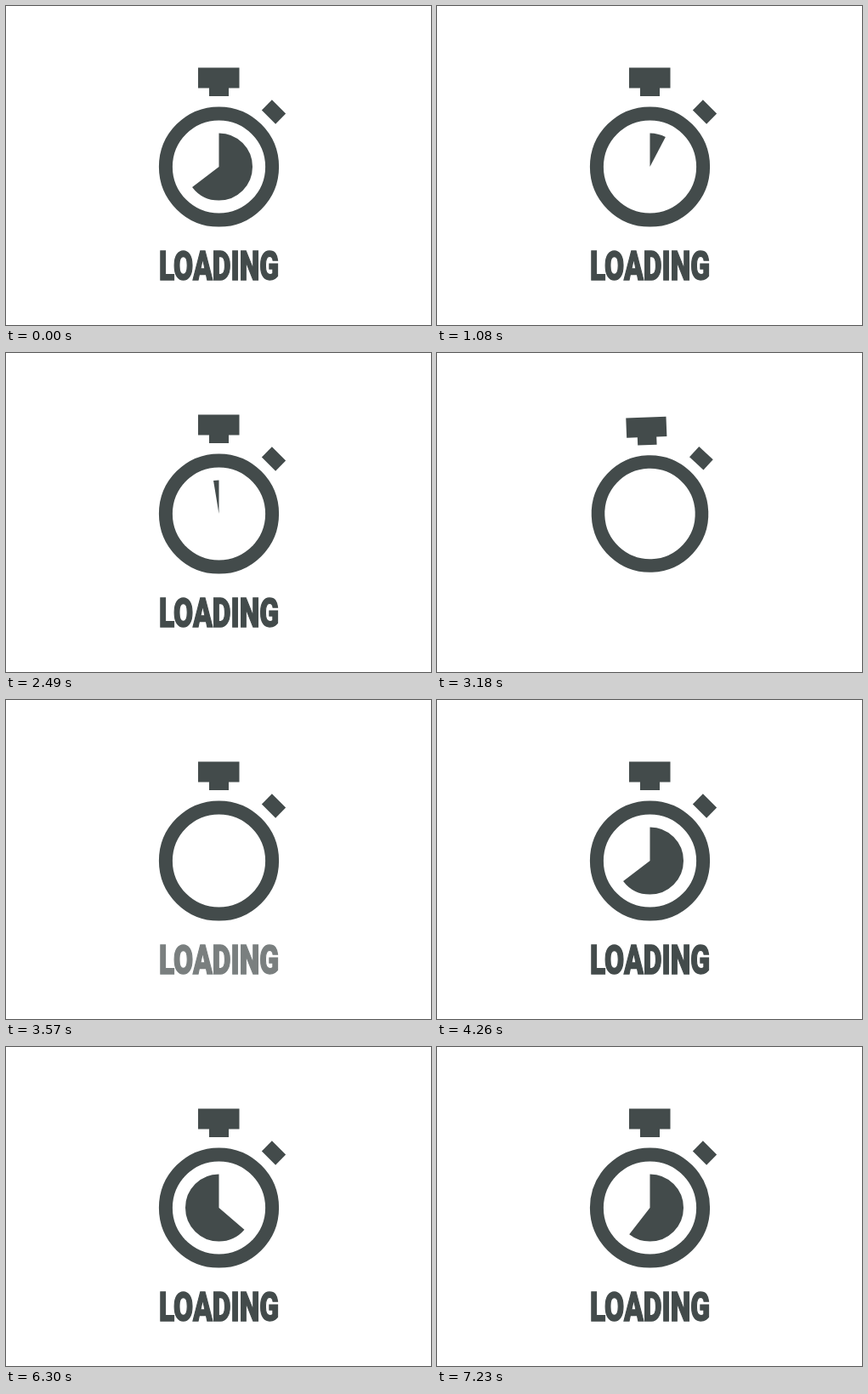
Write an HTML page that moves like this. It is 500 px wide and 375 px high and loops after 7260 ms.

```html
<!DOCTYPE html>
<html lang="en">
<head>
<meta charset="utf-8">
<title>Loading stopwatch</title>
<style>
  html, body { margin: 0; width: 100%; height: 100%; overflow: hidden; background: #fff; }
  svg { display: block; width: 500px; height: 375px; fill: #434b4b; }
  .line { fill: none; stroke: #434b4b; }
  text { font: 900 47.5px Roboto, "Liberation Sans", sans-serif; text-anchor: middle;
         stroke: #434b4b; stroke-width: 1.5px; }
</style>
</head>
<body>
<svg viewBox="0 0 500 375">
  <!-- the watch is drawn around its own centre -->
  <g id="watch">
    <circle class="line" r="62.6" stroke-width="16"/>
    <path d="M-24.5-116.5h48.5v24h-12.5v9.5h-23v-9.5h-13z"/>
    <rect x="-11.5" y="-8.5" width="23" height="17" transform="translate(64.5 -64.5) rotate(45)"/>
    <circle id="pie" class="line" r="19.75" stroke-width="39.5" pathLength="360" transform="rotate(-90)"/>
  </g>
  <g transform="translate(250.5 322.4) scale(.707 1)"><text id="label">LOADING</text></g>
</svg>
<script>
  const LOOP = 7260, STEP = 30, INTRO = 780, OUTRO = 6780, TURN = 1500, SPEED = 0.4878;
  const [watch, pie, label] = ["watch", "pie", "label"].map(id => document.getElementById(id));
  const clamp = (v, max = 1) => Math.min(max, Math.max(0, v));

  function drawPie(x) {
    const v = (x - INTRO) % TURN;
    const filled = clamp(SPEED * (v - 3), 360);
    const drained = clamp(SPEED * (v - 752), 360);
    const shown = x >= INTRO && x < OUTRO && filled > drained;
    pie.style.display = shown ? "" : "none";
    pie.setAttribute("stroke-dasharray", `0 ${drained} ${filled - drained} 720`);
  }

  function draw(time) {
    // x counts from the moment the stage is empty
    const x = (Math.floor((time + 1) / STEP) * STEP + 4260) % LOOP;

    const away = x < INTRO ? clamp(1 - x / 300) : clamp((x - OUTRO - 180) / 300);
    const scale = 1 - away ** 4, angle = -540 * away ** 6;
    watch.setAttribute("transform", `translate(250.5 189) rotate(${angle}) scale(${scale})`);

    label.style.opacity = x < INTRO ? clamp((x - 210) / 510) : clamp(1 - (x - OUTRO) / 240);
    drawPie(x);
  }

  function tick() {
    draw(performance.now());
    requestAnimationFrame(tick);
  }
  tick();
</script>
</body>
</html>
```
